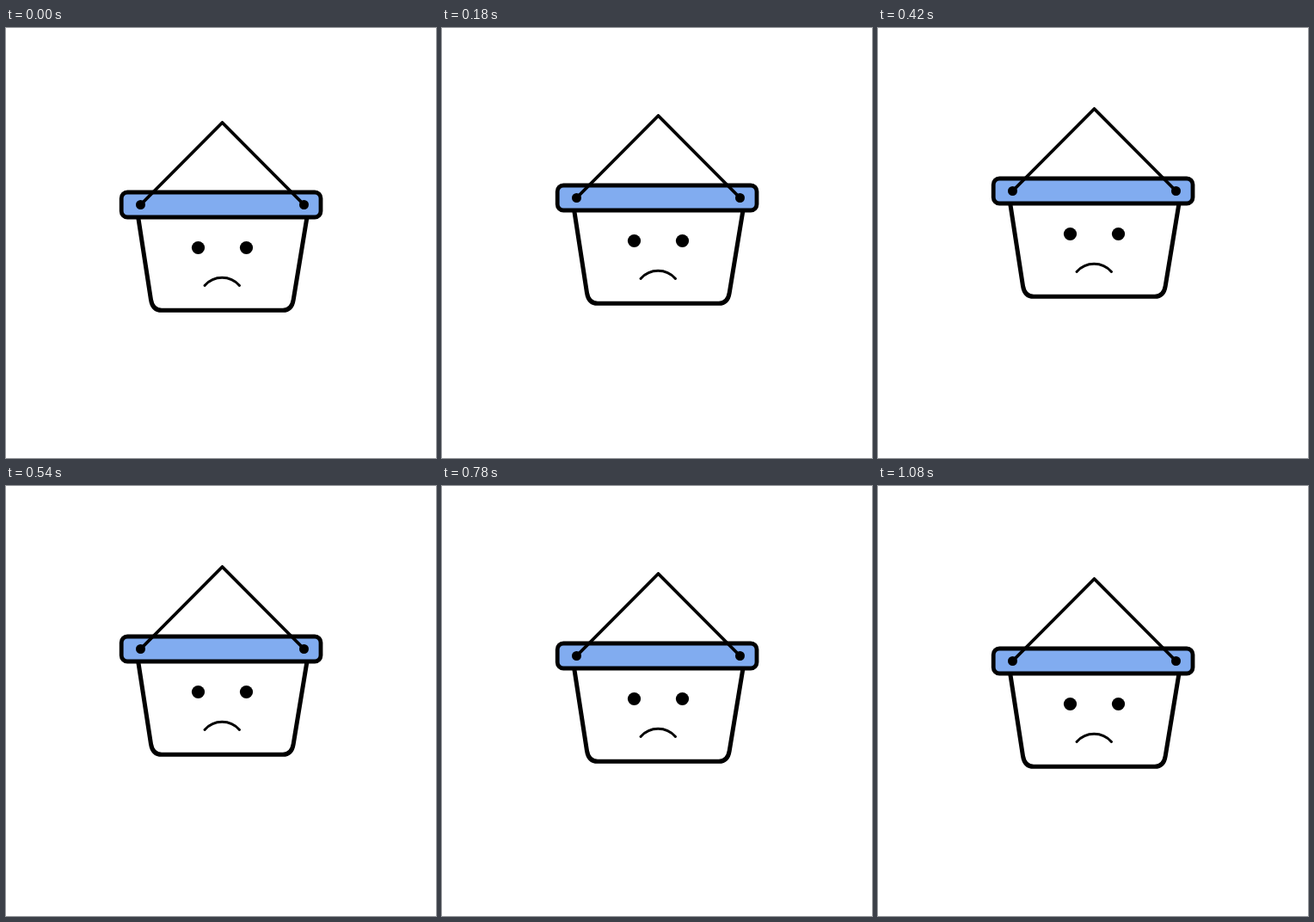
An HTML page for the animation above (1.14 s loop, 500 by 500 pixels).

```html
<!DOCTYPE html>
<html lang="en">
<head>
<meta charset="utf-8">
<title>Sad bucket</title>
<style>
  html, body { margin: 0; width: 100%; height: 100%; overflow: hidden; background: #fff; }
  svg { display: block; width: 100%; height: 100%; }
  .line { fill: none; stroke: #000; stroke-linecap: round; stroke-linejoin: round; }

  /* One slow hop in 19 steps of 60 ms: up, a short rest, down again */
  .bucket { animation: hop 1140ms -1ms infinite; }
  @keyframes hop {
    0% { transform: translateY(0); animation-timing-function: steps(1); }
    5.2632% { transform: translateY(-4px); animation-timing-function: steps(6); }
    36.8421% { transform: translateY(-16px); animation-timing-function: steps(1); }
    47.3684% { transform: translateY(-16px); animation-timing-function: steps(5); }
    73.6842% { transform: translateY(-6px); animation-timing-function: steps(1); }
    78.9474%, 100% { transform: translateY(-2px); }
  }
</style>
</head>
<body>
<svg viewBox="0 0 500 500">
  <g class="bucket">
    <path class="line" stroke-width="5" d="M153.700 220L168.500 316Q170.500 328.300 181 328.300H322Q332.200 328.300 334.200 316L350 220"/>
    <rect x="134.200" y="191" width="231.800" height="29" rx="7" fill="#81acf0" stroke="#000" stroke-width="4.800"/>
    <path class="line" stroke-width="3.800" d="M156.500 205.500L251.500 110L346.500 205.500"/>
    <circle cx="156.500" cy="205.500" r="5.500"/>
    <circle cx="346.500" cy="205.500" r="5.500"/>
    <circle cx="223.500" cy="255.500" r="7.600"/>
    <circle cx="279.500" cy="255.500" r="7.600"/>
    <path class="line" stroke-width="3" d="M231 299.500C242 287.300 260.500 287.300 271.500 299.500"/>
  </g>
</svg>
</body>
</html>
```
